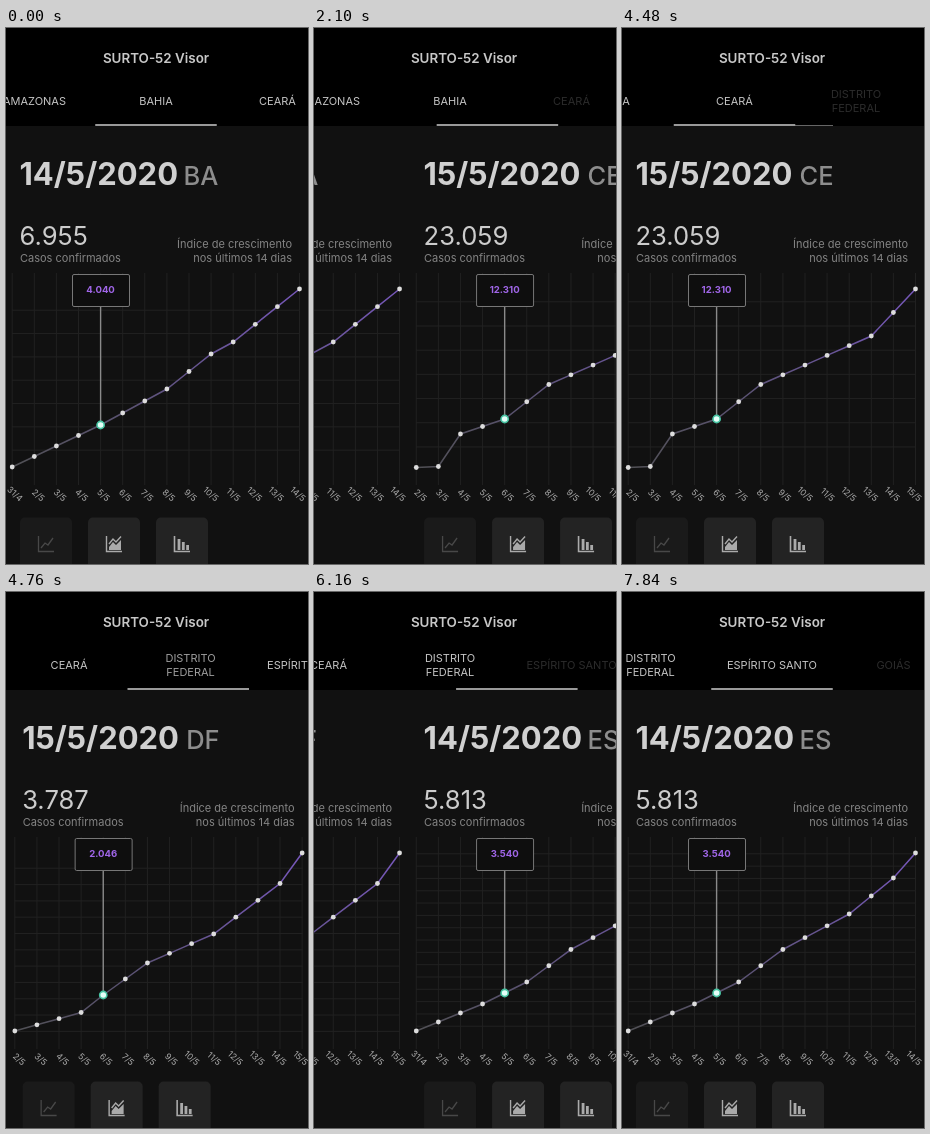
Animation of 302x536 px, one loop 8000 ms. Source, as an HTML page:

```html
<!DOCTYPE html>
<html lang="pt">
<head>
<meta charset="utf-8">
<style>
  html, body { margin: 0; width: 100%; height: 100%; overflow: hidden; background: #000; }
  svg { display: block; width: 100%; height: 100%; font-family: Inter, Roboto, sans-serif; }
  .title { font-size: 13.4px; font-weight: 600; fill: #c8c8c8; }
  .tab { font-size: 11px; fill: #c4c4c4; }
  .date { font-size: 31px; font-weight: 700; fill: #d0d0d0; }
  .state { font-size: 25.5px; font-weight: 500; fill: #8d8d8d; }
  .total { font-size: 25.6px; font-weight: 400; fill: #ccc; }
  .note { font-size: 11px; fill: #848484; }
  .day { font-size: 8.6px; fill: #aaa; }
  .tip { font-size: 9.6px; font-weight: 700; fill: #a066e8; }
  .mid { text-anchor: middle; }
  .end { text-anchor: end; }
</style>
</head>
<body>
<svg viewBox="0 0 302 536" preserveAspectRatio="none">
  <defs>
    <linearGradient id="ink" gradientUnits="userSpaceOnUse" x1="6" x2="294" y1="0" y2="0">
      <stop offset="0" stop-color="#505054"/>
      <stop offset=".4" stop-color="#5a5272"/>
      <stop offset="1" stop-color="#7657ba"/>
    </linearGradient>
  </defs>
  <rect y="98" width="302" height="438" fill="#111"/>
  <g id="pages"></g>
  <rect width="302" height="98"/>
  <text class="title mid" x="150" y="35">SURTO-52 Visor</text>
  <g id="tabs"></g>
  <rect id="trail" x="89" y="97" width="122" height="1" fill="#666"/>
  <rect id="bar" y="96" width="121.5" height="2" fill="#999"/>
</svg>
<script>
const $ = id => document.getElementById(id);
const LOOP = 8000, TICK = 70, PAGE = 304, TAB = 121.5, MARK = 4, DAYS = 14;

// knots: day -> height on screen; the days between lie on straight segments
const pages = [
  { date: '14/5/2020', state: 'BA', total: 6955, mark: 4040, grid: 500,
    knots: { 0: 439, 4: 397, 7: 361, 9: 326, 10: 314, 13: 261 } },
  { date: '15/5/2020', state: 'CE', total: 23059, mark: 12310, grid: 2000,
    knots: { 0: 439.5, 1: 438.5, 2: 406, 4: 391, 6: 356.5, 11: 308, 13: 261 } },
  { date: '15/5/2020', state: 'DF', total: 3787, mark: 2046, grid: 200,
    knots: { 0: 439, 3: 420.5, 4: 403, 6: 371, 9: 342, 12: 291.5, 13: 261 } },
  { date: '14/5/2020', state: 'ES', total: 5813, mark: 3540, grid: 200,
    knots: { 0: 439, 3: 412, 5: 390, 7: 357.5, 10: 322, 12: 286, 13: 261 } },
];
const tabNames = ['AMAZONAS', 'BAHIA', 'CEARÁ', 'DISTRITO FEDERAL', 'ESPÍRITO SANTO', 'GOIÁS'];

// Each swipe dims the next tab, then jumps in mid-motion and settles at its own pace
const swipes = [
  { press: 1820, at: 2100, pace: 1.5, lead: .39, drag: 37.5 },
  { press: 4480, at: 4690, pace: 3.8, lead: .47, drag: 0 },
  { press: 5880, at: 6160, pace: 1.8, lead: .55, drag: 0 },
  { press: 7840, at: LOOP },
];
// Stretches in which the screen stands still; each counts as a single tick of motion
const stalls = [[2100, 2240], [2240, 3220], [4760, 5670], [6370, 7070]];

const clamp = v => Math.max(0, Math.min(1, v));
const mix = (a, b, k) => a + (b - a) * k;
const range = n => [...Array(n).keys()];
const dotted = n => String(n).replace(/\B(?=(\d{3})+$)/g, '.');
const px = day => 6.2 + day * 22.1;
const text = (cls, x, y, str, extra = '') => `<text class="${cls}" x="${x}" y="${y}" ${extra}>${str}</text>`;
const path = (d, stroke, width = 1, fill = 'none') =>
  `<path d="${d}" stroke="${stroke}" stroke-width="${width}" fill="${fill}"/>`;

function heightAt(knots, day) {
  const days = Object.keys(knots).map(Number);
  const next = days.find(d => d >= day), prev = days.findLast(d => d <= day);
  return next === prev ? knots[day] : mix(knots[prev], knots[next], (day - prev) / (next - prev));
}

function gridLines({ total, mark, grid }, ys) {
  const perPixel = (total - mark) / (ys[MARK] - ys[DAYS - 1]);
  let d = range(DAYS).map(i => `M${px(i)} 245V457`).join('');
  for (let v = Math.floor(total / grid) * grid; v > 0; v -= grid) {
    const y = ys[DAYS - 1] + (total - v) / perPixel;
    if (y < 440) d += `M6 ${y}H294`;
  }
  return path(d, '#212121');
}

function dayLabels(first) {
  return range(DAYS).map(i => {
    const label = first + i === 1 ? '31/4' : `${first + i}/5`;
    const x = 13.5 + i * 21.75;
    return text('day end', x, 474, label, `transform="rotate(42 ${x} 474)"`);
  }).join('');
}

function chart(page) {
  const ys = range(DAYS).map(i => heightAt(page.knots, i));
  const x = px(MARK), y = ys[MARK];
  return gridLines(page, ys)
    + path('M' + ys.map((cy, i) => `${px(i)} ${cy}`).join('L'), 'url(#ink)', 1.5)
    + path(`M${x} 278V${y}`, '#8a8a8a', 1.4)
    + ys.map((cy, i) => `<circle cx="${px(i)}" cy="${cy}" r="2.4" fill="#ddd"/>`).join('')
    + `<circle cx="${x}" cy="${y}" r="3.6" fill="#e4fff8" stroke="#45c4a2" stroke-width="1.6"/>`
    + `<rect x="66.5" y="246.5" width="57" height="32" rx="1.5" fill="#0e0e0e" stroke="#777"/>`
    + text('tip mid', x, 265.3, dotted(page.mark))
    + dayLabels(parseInt(page.date) - 13);
}

function buttons() {
  const axis = 'M32.5 508V523.5H48';
  const icons = [
    path(axis + 'M35 520L39 515L42 517L47 510', '#484848', 1.3),
    path(axis + 'M35 516L39 511L42 514L47 508.5', '#aaa', 1.4)
      + path('M35 522V519L39 514L42 517L47 512V522Z', 'none', 0, '#aaa'),
    path(axis, '#aaa', 1.6) + path('M37 522V511M41.3 522V514M45.6 522V517', '#aaa', 2.8),
  ];
  return icons.map((icon, i) => `<g transform="translate(${i * 68})">
    <rect x="14" y="489.5" width="52" height="52" rx="5" fill="${i ? '#232323' : '#1a1a1a'}"/>${icon}</g>`).join('');
}

$('pages').innerHTML = pages.map((page, i) => `<g transform="translate(${i * PAGE})">`
  + text('date', 13.5, 157, page.date)
  + text('state', 177.5, 157, page.state)
  + text('total', 13.5, 216.7, dotted(page.total))
  + text('note', 14, 233.6, 'Casos confirmados')
  + text('note end', 286, 219.6, 'Índice de crescimento')
  + text('note end', 286, 233.6, 'nos últimos 14 dias')
  + chart(page) + buttons() + '</g>').join('');

$('tabs').innerHTML = tabNames.map((name, i) => {
  const lines = name.startsWith('DISTRITO') ? name.split(' ') : [name];
  const top = lines.length > 1 ? 70 : 77;
  return '<g>' + lines.map((line, n) => text('tab mid', 150 + (i - 1) * TAB, top + n * 14, line)).join('') + '</g>';
}).join('');
const tabs = [...$('tabs').children];

function motionClock(t) {
  return stalls.reduce((clock, [from, to]) =>
    clock - (t >= to ? to - from - TICK : Math.max(0, t - from)), t);
}

function draw() {
  const t = Math.floor(performance.now() % LOOP / TICK) * TICK;
  let pan = 0, scroll = 0, barTab = 0, trail = 0;

  swipes.forEach(({ press, at, pace, lead, drag }, i) => {
    const u = (motionClock(t) - motionClock(at)) * pace;
    const moving = t >= at;
    const opacity = t < press ? 1 : moving ? Math.min(1, .22 + .0022 * u) : .22;
    tabs[i + 2].setAttribute('opacity', opacity);
    if (!moving) return;
    const dragged = drag * clamp((u - 525) / 315);
    pan = i + 1 - .316 * Math.exp(-u / 74);
    scroll = mix(scroll, (i + 1) * TAB, clamp(.115 + .00178 * u)) + dragged;
    barTab = i + 1 - (1 - lead) * Math.exp(-u / 80);
    trail = dragged > 0 ? 1 : 0;
  });

  $('pages').setAttribute('transform', `translate(${-pan * PAGE})`);
  $('tabs').setAttribute('transform', `translate(${-scroll})`);
  $('bar').setAttribute('x', 150 + (barTab - .5) * TAB - scroll);
  $('trail').setAttribute('opacity', trail);
  requestAnimationFrame(draw);
}
draw();
</script>
</body>
</html>
```
